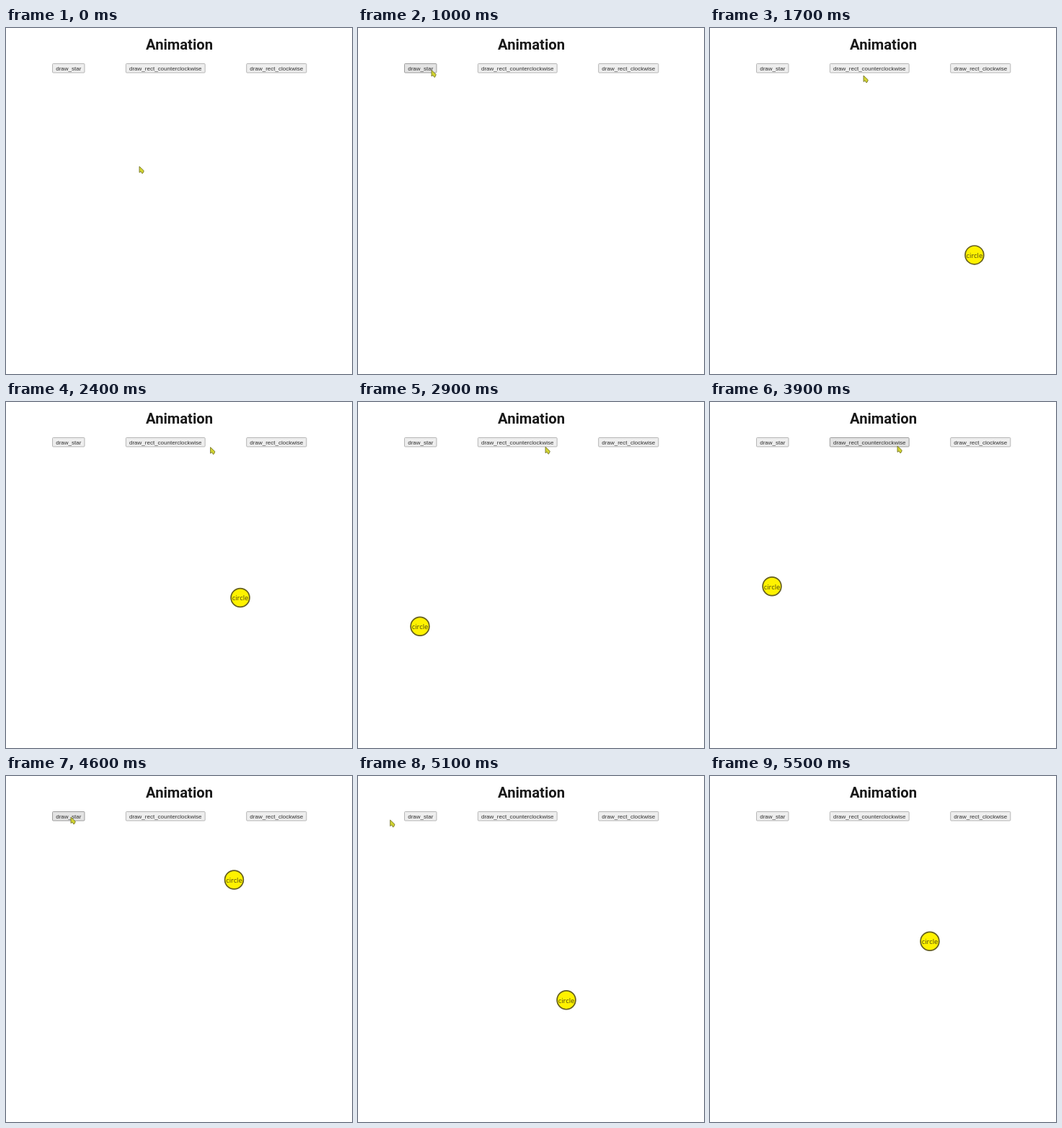
These frames come from a looping animation (480x480 px, 5600 ms). An HTML page with a canvas:

```html
<!DOCTYPE html>
<html lang="en">
<head>
<meta charset="utf-8">
<title>Animation</title>
<style>
  html, body { margin: 0; width: 100%; height: 100%; overflow: hidden; background: #fff; }
  canvas { display: block; width: 480px; height: 480px; filter: blur(0.5px); }
</style>
</head>
<body>
<canvas id="stage" width="480" height="480"></canvas>
<script>
const ctx = document.getElementById('stage').getContext('2d');
const LOOP = 5600, STEP = 100;
const LABEL_FONT = '8px "Liberation Sans", Arial, sans-serif';

const mix = (a, b, k) => a + (b - a) * k;
const between = (a, b, k) => [mix(a[0], b[0], k), mix(a[1], b[1], k)];
const clamp = k => Math.min(1, Math.max(0, k));

// Walks from point(0) to point(1) and on, each leg taking the same time.
function walk(point, t, leg) {
  const n = Math.floor(t / leg);
  return between(point(n), point(n + 1), t / leg - n);
}

const box = { left: 86, top: 144, right: 325, bottom: 375 };
// Corners clockwise from the top right; negative numbers go the other way.
function corner(n) {
  const i = (n % 4 + 4) % 4;
  return [i < 2 ? box.right : box.left, i % 3 ? box.bottom : box.top];
}

// Pentagram tips from the right one on, each two fifths of a turn further.
function tip(n) {
  const a = Math.PI * (n * 0.8 - 0.1);
  return [250 + 202 * Math.cos(a), 262 + 202 * Math.sin(a)];
}

function star(t) {
  const turn = [372, 318], turnAt = 224, tipAt = 320;
  if (t < turnAt) return between([box.left, box.top], turn, t / turnAt);
  if (t < tipAt) return between(turn, tip(0), (t - turnAt) / (tipAt - turnAt));
  return walk(tip, t - tipAt, 203);
}

const scenes = [
  { start: 1480, path: star },
  { start: 2240, path: t => walk(corner, t, 290) },
  { start: 3493, path: t => walk(n => corner(-n), t, 274.3) },
  { start: 4680, path: star }
];

// Cursor moves: departure, arrival, x, y.
const moves = [
  [100, 600, 116, 60],
  [800, 1200, 88, 57],
  [1450, 1700, 213, 66],
  [1700, 2100, 372, 58],
  [2250, 2440, 260, 64],
  [2500, 2600, 260, 62.3],
  [3400, 3450, 260, 61],
  [4050, 4480, 90, 57],
  [4900, 5350, -12, 66]
];

const cursorAt = t => moves.reduce(
  (p, [from, to, x, y]) => between(p, [x, y], clamp((t - from) / (to - from))),
  [185, 192]
);

function text(str, x, y, font, color) {
  ctx.font = font;
  ctx.fillStyle = color;
  ctx.textAlign = 'center';
  ctx.fillText(str, x, y);
}

function paint(fill, stroke, width) {
  ctx.fillStyle = fill;
  ctx.fill();
  ctx.lineWidth = width;
  ctx.strokeStyle = stroke;
  ctx.stroke();
}

function drawButton(label, center, [cx, cy]) {
  ctx.font = LABEL_FONT;
  const w = ctx.measureText(label).width + 9.3, top = 49.5, h = 12.5;
  const hot = Math.abs(cx - center) < w / 2 && cy > top && cy < top + h;
  ctx.beginPath();
  ctx.roundRect(center - w / 2, top, w, h, 1);
  paint(hot ? '#e3e3e3' : '#eeeeee', hot ? '#9c9c9c' : '#b5b5b5', 1);
  text(label, center, 58.5, LABEL_FONT, '#303030');
}

function drawCircle([x, y]) {
  ctx.beginPath();
  ctx.arc(x, y, 12.9, 0, Math.PI * 2);
  paint('#fff200', '#655f20', 1.7);
  text('circle', x, y + 4, '9.4px "Open Sans", sans-serif', '#4d4710');
}

function drawCursor([x, y]) {
  ctx.beginPath();
  ctx.moveTo(x, y);
  ctx.lineTo(x, y + 8.5);
  ctx.lineTo(x + 2, y + 7);
  ctx.lineTo(x + 4, y + 10);
  ctx.lineTo(x + 5.2, y + 9);
  ctx.lineTo(x + 6.3, y + 6);
  ctx.closePath();
  paint('#d2d430', '#77762f', 0.9);
}

function draw(t) {
  ctx.fillStyle = '#fff';
  ctx.fillRect(0, 0, 480, 480);
  text('Animation', 240.5, 30.3, 'bold 20.2px Roboto, sans-serif', '#181818');

  const cursor = cursorAt(t);
  drawButton('draw_star', 86.75, cursor);
  drawButton('draw_rect_counterclockwise', 221.25, cursor);
  drawButton('draw_rect_clockwise', 375.25, cursor);

  const scene = scenes.findLast(s => s.start <= t);
  if (scene) drawCircle(scene.path(t - scene.start));
  drawCursor(cursor);
}

const start = performance.now();
function tick() {
  const t = (performance.now() - start) % LOOP;
  draw(Math.floor(t / STEP) * STEP);
  requestAnimationFrame(tick);
}
tick();
</script>
</body>
</html>
```
